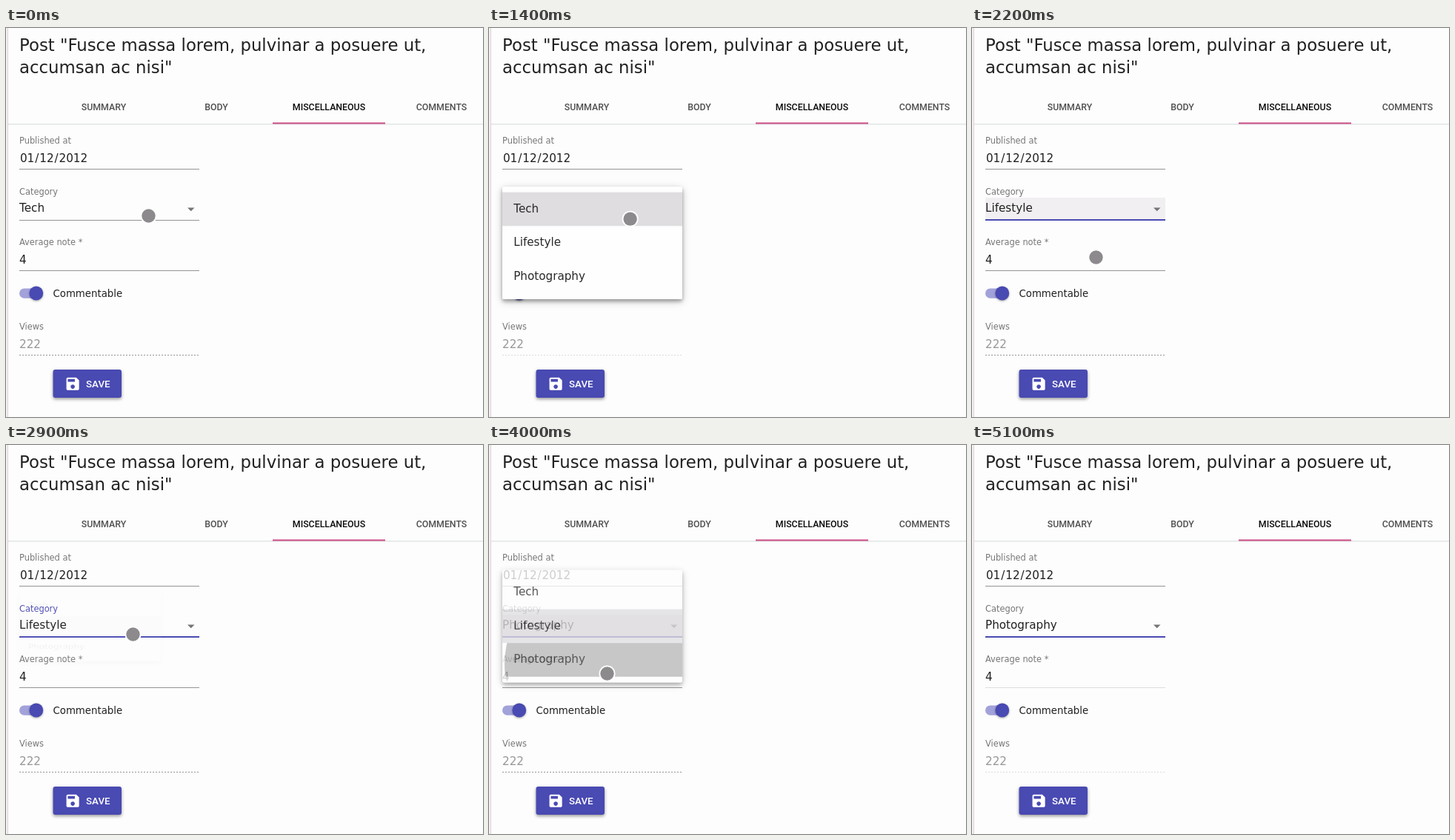
Write an HTML page with a canvas that moves like this. It is 644x525 px and loops after 5200 ms.

```html
<!DOCTYPE html>
<html lang="en">
<head>
<meta charset="utf-8">
<title>Post form</title>
<style>
  html, body { margin: 0; width: 100%; height: 100%; overflow: hidden; background: #fdfdfd; }
  canvas { display: block; }
</style>
</head>
<body>
<canvas id="stage" width="644" height="525"></canvas>
<script>
const W = 644, H = 525, LOOP = 5200, STEP = 100;
const SANS = '"DejaVu Sans", sans-serif', ROBOTO = 'Roboto, sans-serif';
const PAGE = '#fdfdfd', INK = '#212121', MUTED = '#767676', LINE = '#949494';
const PRIMARY = '#494ab2', SHADE = '#dfdde0';
const LEFT = 18, FIELD = 243, ROW = 45.6, PAD = 7.6, MID = 244.4;
const OPTIONS = ['Tech', 'Lifestyle', 'Photography'];

// One entry per use of the dropdown
const MENUS = [
  { open: 870, close: 2010, span: 190, from: 0, to: 1, press: 2000, x: 155, y: 297 },
  { open: 2870, close: 3930, span: 230, from: 1, to: 2, press: 3800, x: 147, y: 296 }
];
const MOVES = [
  { start: 1300, end: 1900, to: [167, 309] },
  { start: 2300, end: 2800, to: [171, 255] },
  { start: 3100, end: 3500, to: [159, 308] }
];
const SAVE_ICON = new Path2D('M17 3H5c-1.11 0-2 .9-2 2v14c0 1.1.89 2 2 2h14c1.1 0 2-.9 2-2V7l-4-4z' +
  'm-5 16c-1.66 0-3-1.34-3-3s1.34-3 3-3 3 1.34 3 3-1.34 3-3 3zm3-10H5V5h10v4z');

const ctx = document.getElementById('stage').getContext('2d');
const layer = document.createElement('canvas');
layer.width = W;
layer.height = H;
const lctx = layer.getContext('2d');

const clamp = v => Math.min(1, Math.max(0, v));
const smooth = v => v * v * (3 - 2 * v);
const between = (t, a, b) => t >= a && t < b;

function text(c, str, x, y, size, color = INK, font = SANS, weight = 400, align = 'left') {
  c.font = `${weight} ${size}px ${font}`;
  c.fillStyle = color;
  c.textAlign = align;
  c.fillText(str, x, y);
}

function rect(c, x, y, w, h, color) {
  c.fillStyle = color;
  c.fillRect(x, y, w, h);
}

function disc(c, x, y, r, color) {
  c.fillStyle = color;
  c.beginPath();
  c.arc(x, y, r, 0, Math.PI * 2);
  c.fill();
}

function rounded(c, x, y, w, h, r, color) {
  c.fillStyle = color;
  c.beginPath();
  c.roundRect(x, y, w, h, r);
  c.fill();
}

function shadowed(c, dy, blur, alpha, draw) {
  c.save();
  c.shadowColor = `rgba(0,0,0,${alpha})`;
  c.shadowOffsetY = dy;
  c.shadowBlur = blur;
  draw();
  c.restore();
}

const label = (str, y, color = MUTED) => text(ctx, str, LEFT, y, 11.4, color);
const value = (str, y, color = INK) => text(ctx, str, LEFT, y, 15.2, color);

function drawHeader() {
  rect(ctx, 0, 0, W, H, PAGE);
  rect(ctx, 0, 0, 2, H, '#f6f0f3');
  rect(ctx, 2, 0, 1, H, '#ddd3d8');
  text(ctx, 'Post "Fusce massa lorem, pulvinar a posuere ut,', LEFT, 31, 22.8);
  text(ctx, 'accumsan ac nisi"', LEFT, 61, 22.8);
  rect(ctx, 3, 129, W - 3, 1.5, '#e2e5e5');
  ['SUMMARY', 'BODY', 'MISCELLANEOUS', 'COMMENTS'].forEach((name, i) =>
    text(ctx, name, 132 + 152 * i, 111, 12.35, i === 2 ? '#0c0c0c' : '#505050', ROBOTO, 500, 'center'));
  rect(ctx, 360, 127.5, 152, 2, '#cc4c86');
}

function drawDate() {
  label('Published at', 156);
  let x = LEFT + 0.95;
  for (const part of ['01', '/', '12', '/', '2012']) {
    text(ctx, part, x, 181, 15.2);
    x += ctx.measureText(part).width + (part === '/' ? 0.95 : 0.9);
  }
  rect(ctx, LEFT, 190, FIELD, 1, LINE);
}

function drawCategory(t) {
  const active = MENUS.some((m, i) => between(t, i ? 2900 : 800, m.close));
  const focused = between(t, 2010, 2900) || between(t, 3930, 5100);
  const picked = MENUS.reduce((cur, m) => t >= m.close ? m.to : cur, 0);
  if (focused) rect(ctx, LEFT, 229, FIELD, 30, '#f1eff1');
  label('Category', 225, active ? PRIMARY : MUTED);
  value(OPTIONS[picked], 248);
  ctx.fillStyle = '#757575';
  ctx.beginPath();
  ctx.moveTo(245, 242.5);
  ctx.lineTo(254.5, 242.5);
  ctx.lineTo(249.75, 247.2);
  ctx.fill();
  rect(ctx, LEFT, 259, FIELD, 1, LINE);
  const w = FIELD * smooth(clamp((t - 720) / 200));
  if (w) rect(ctx, LEFT + (FIELD - w) / 2, 258, w, 2, PRIMARY);
}

function drawRest(t) {
  const pale = between(t, 1000, 2000) || t >= 5100;
  label('Average note *', 293);
  value('4', 318);
  rect(ctx, LEFT, 327, FIELD, 1, pale ? '#dedede' : LINE);

  rounded(ctx, LEFT, 351.4, 29, 13.3, 6.65, '#a2a2da');
  shadowed(ctx, 1, 3, 0.35, () => disc(ctx, 40.8, 358, 9.4, PRIMARY));
  text(ctx, 'Commentable', 63.5, 363, 13.3);

  label('Views', 407);
  value('222', 432, '#999');
  ctx.strokeStyle = pale ? '#dcdcdc' : LINE;
  ctx.lineWidth = 1;
  ctx.setLineDash([2, 2]);
  ctx.beginPath();
  ctx.moveTo(LEFT, 441.5);
  ctx.lineTo(LEFT + FIELD, 441.5);
  ctx.stroke();
  ctx.setLineDash([]);

  shadowed(ctx, 2, 4, 0.4, () => rounded(ctx, 63.5, 461, 92.5, 38, 3, PRIMARY));
  ctx.save();
  ctx.translate(78.7, 468.9);
  ctx.scale(0.95, 0.95);
  ctx.fillStyle = '#fff';
  ctx.fill(SAVE_ICON);
  ctx.restore();
  text(ctx, 'SAVE', 108, 485, 13.3, '#fff', ROBOTO, 500);
}

function drawMenu(t, m) {
  const enter = clamp((t - m.open) / 230);
  const exit = clamp((t - m.close) / m.span);
  if (enter <= 0 || exit >= 1) return;
  const grow = 1 - (1 - enter ** 1.5) ** 3.3;
  const shrink = smooth(clamp((exit - 0.33) / 1));
  const s = 0.75 + 0.25 * grow * (1 - shrink);
  const rows = 221.6 - ROW * m.from;
  const top = rows - PAD, height = ROW * 3 + PAD * 2;

  lctx.clearRect(0, 0, W, H);
  lctx.save();
  lctx.translate(LEFT, MID);
  lctx.scale(s, s * s);
  lctx.translate(-LEFT, -MID);
  const panel = () => rounded(lctx, LEFT, top, FIELD, height, 2, '#fefefe');
  shadowed(lctx, 3, 5, 0.3, panel);
  shadowed(lctx, 3, 12, 0.22, panel);
  rect(lctx, LEFT, rows + ROW * m.from, FIELD, ROW, SHADE);

  if (t >= m.press) {
    lctx.save();
    lctx.beginPath();
    lctx.rect(LEFT, rows + ROW * m.to, FIELD, ROW);
    lctx.clip();
    disc(lctx, m.x, m.y, 6 + (t - m.press) * 0.6, 'rgba(0,0,0,.28)');
    lctx.restore();
  }
  OPTIONS.forEach((name, i) => text(lctx, name, LEFT + 15.2, rows + ROW * i + 26.9, 15.2, '#2b292b'));
  lctx.restore();

  ctx.globalAlpha = smooth(enter) * (1 - smooth(exit));
  ctx.drawImage(layer, 0, 0);
  ctx.globalAlpha = 1;
}

function drawPointer(t) {
  let x = 192.5, y = 253.5;
  for (const { start, end, to } of MOVES) {
    const k = smooth(clamp((t - start) / (end - start)));
    x += (to[0] + 0.5 - x) * k;
    y += (to[1] + 0.5 - y) * k;
  }
  // Accelerates out past the top edge
  const leave = Math.max(0, (t - 4400) / 500) ** 1.5;
  x -= 107 * leave;
  y -= 289 * leave;
  disc(ctx, x, y, 11, '#fefefe');
  disc(ctx, x, y, 9.2, '#8c8a8c');
}

function frame(now) {
  const t = Math.floor(now % LOOP / STEP) * STEP;
  drawHeader();
  drawDate();
  drawCategory(t);
  drawRest(t);
  MENUS.forEach(m => drawMenu(t, m));
  drawPointer(t);
}

const begin = performance.now();
function tick() {
  frame(performance.now() - begin);
  requestAnimationFrame(tick);
}
tick();
</script>
</body>
</html>
```
